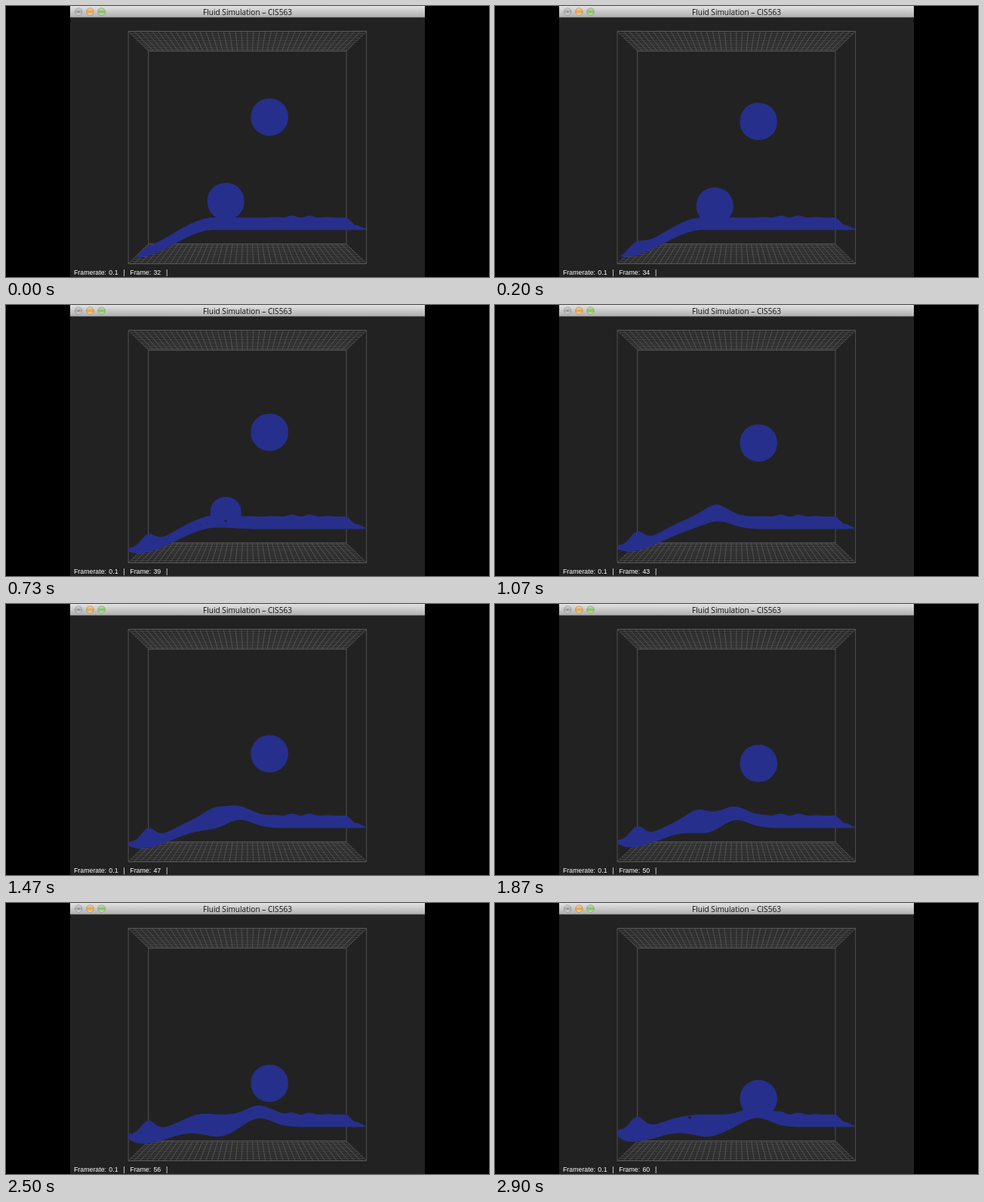
Write an HTML page that moves like this. It is 640 px wide and 360 px high and loops after 3030 ms.

```html
<!DOCTYPE html>
<html lang="en">
<head>
<meta charset="utf-8">
<title>Fluid Simulation</title>
<style>
  html, body { margin: 0; width: 100%; height: 100%; overflow: hidden; background: #000; }
  svg { display: block; width: 640px; height: 360px; }
  .title { font: 10.1px "Open Sans", "Noto Sans", sans-serif; fill: #111; text-anchor: middle; }
  .status { font: 8.8px "Liberation Sans", Arial, sans-serif; fill: #fff; white-space: pre; word-spacing: .9px; }
  .grid { fill: none; stroke: #747474; stroke-width: .5; }
  .box { fill: none; stroke: #626262; stroke-width: .75; }
  .fluid { fill: #272f8c; }
  .gap { fill: #222; }
</style>
</head>
<body>
<svg viewBox="0 0 640 360">
  <defs>
    <linearGradient id="bar" x2="0" y2="1">
      <stop offset="0" stop-color="#e2e2e2"/>
      <stop offset="1" stop-color="#b0b0b0"/>
    </linearGradient>
    <linearGradient id="shine" x2="0" y2="1">
      <stop offset="0" stop-color="#fff" stop-opacity=".55"/>
      <stop offset=".5" stop-color="#fff" stop-opacity="0"/>
      <stop offset="1" stop-color="#fff" stop-opacity=".55"/>
    </linearGradient>
  </defs>
  <rect x="85" width="470" height="360" fill="#222"/>
  <rect x="85" width="470" height="15" fill="url(#bar)"/>
  <rect x="85" y="14.8" width="470" height=".6" fill="#666"/>
  <g id="buttons"></g>
  <text class="title" x="320" y="11.6">Fluid Simulation – CIS563</text>
  <path class="grid" id="grid"/>
  <path class="box" id="box"/>
  <path class="fluid" id="fluid"/>
  <g class="gap" id="gaps"></g>
  <text class="status" id="status" x="90" y="357"></text>
</svg>
<script>
const LOOP = 3030, LEFT = 162, RIGHT = 477, FIRST = 32, LAST = 60;
const el = id => document.getElementById(id);

// Window buttons
el('buttons').innerHTML = ['#a8a8a8', '#e8a244', '#86c060'].map((color, i) => {
  const x = 96.2 + 15.2 * i;
  return `<circle cx="${x}" cy="7.6" r="4.9" fill="${color}" stroke="#888" stroke-width=".5"/>` +
    `<circle cx="${x}" cy="7.6" r="4.4" fill="url(#shine)"/>`;
}).join('') + '<circle cx="96.2" cy="7.6" r="1.2" fill="#888"/>';

// Perspective box: depth 0 is the front face, 1 the back face
function project(u, v, depth) {
  const s = 1 / (1 + 0.203 * depth);
  return `${(319.9 + (u - 0.5) * 315.6 * s).toFixed(2)},${(188 + (v - 0.5) * 308.5 * s).toFixed(2)}`;
}
const line = (a, b) => `M${a}L${b}`;
const COLS = 40, ROWS = 10;
let mesh = '', frame = '';
for (const v of [0, 1]) {
  for (let i = 0; i <= COLS; i++) mesh += line(project(i / COLS, v, 0), project(i / COLS, v, 1));
  for (let j = 0; j <= ROWS; j++) mesh += line(project(0, v, j / ROWS), project(1, v, j / ROWS));
}
for (const d of [0, 1])
  frame += `M${project(0, 0, d)}L${project(1, 0, d)}L${project(1, 1, d)}L${project(0, 1, d)}Z`;
el('grid').setAttribute('d', mesh);
el('box').setAttribute('d', frame);

const bump = (x, center, width) => Math.exp(-(((x - center) / width) ** 2) / 2);
function smooth(v) {
  v = Math.min(1, Math.max(0, v));
  return v * v * (3 - 2 * v);
}
// The left bank slopes down towards the wall
const bank = x => smooth((275 - x) / 105);
// The sunken ball sends one wave to the right that lifts the whole sheet
const crest = k => 296 + 3 * (k - 11);
const impact = k => smooth((k - 5) / 8);

function surface(x, k) {
  const ripple = 1.5 * (1 + Math.cos((x - 378) * Math.PI / 12.5)) * bump(x, 390, 20);
  const rightEnd = 10 * smooth((x - 450) / 14) + 4.5 * smooth((x - 464) / 13);
  const leftTip = 22 * Math.exp(-k / 3) * bump(x, LEFT, 10);
  const wallSplash = 16 * (1 - Math.exp(-k / 4)) * bump(x, 188, 9);
  const rightWave = 12 * impact(k) * bump(x, crest(k), 16);
  const leftWave = 9 * impact(k) * bump(k, 15, 6) * bump(x, 290 - 3 * (k - 11), 14);
  return 281 + (41 - 0.026 * k * k) * bank(x) + rightEnd + leftTip
    - ripple - wallSplash - rightWave - leftWave;
}

function underside(x, k) {
  const leftLift = (2 + 0.3 * k) * Math.exp((LEFT - x) / 12);
  const sag = 13 * smooth((k - 11) / 12) * bump(x, 280, 22);
  const arch = 12 * impact(k) * bump(x, crest(k), 18);
  return 297.5 + (38 - 0.55 * k) * bank(x) + sag - leftLift - arch;
}

const toPath = pts => 'M' + pts.map(p => p[0].toFixed(1) + ',' + p[1].toFixed(1)).join('L') + 'Z';

function sheet(k) {
  const upper = [], lower = [];
  for (let x = LEFT + 10 * Math.exp(-k / 2); x <= RIGHT; x++) {
    const base = underside(x, k);
    upper.push([x, Math.min(surface(x, k), base)]);
    lower.unshift([x, base]);
  }
  return toPath(upper.concat(lower));
}

// Slightly squared ball, cut off at the underside once it touches the sheet
function ball(cx, cy, r, k, touching) {
  const soft = v => Math.sign(v) * Math.abs(v) ** 0.97, pts = [];
  for (let i = 0; i < 72; i++) {
    const a = i * Math.PI / 36, x = cx + r * soft(Math.cos(a)), y = cy + r * soft(Math.sin(a));
    pts.push([x, touching ? Math.min(y, underside(x, k)) : y]);
  }
  return toPath(pts);
}
const gap = (x, y, rx, ry, size) =>
  size > 0 ? `<ellipse cx="${x}" cy="${y}" rx="${rx * size}" ry="${ry * size}"/>` : '';

function draw(step) {
  const k = step - FIRST;
  let d = sheet(k);

  // the first ball sinks in, the second falls with growing speed
  if (k < 11) {
    const sunk = Math.max(0, k - 5), r = 24.5 - 2 * sunk;
    d += ball(291.2, 259.5 + 3 * k - 2.6 * sunk, r, k, true);
  }
  d += ball(349.2, 147.6 + 2.75 * k + 0.045 * k * k, 24.7, k, k > 25);
  el('fluid').setAttribute('d', d);

  const open = 1 - Math.abs(k - 5) / 3;
  el('gaps').innerHTML = gap(291, 287, 6, 3.4, open) + gap(267, 289.5, 2.8, 1.8, open) +
    gap(258, 285, 2.2, 1.8, 1 - (LAST - step) / 3);
  el('status').textContent = `Framerate: 0.1  |  Frame: ${step}  |`;
}

let shown = 0;
function tick() {
  const t = performance.now() % LOOP;
  const step = Math.min(LAST, Math.floor(32.94 + 0.0096 * t));
  if (step !== shown) draw(shown = step);
  requestAnimationFrame(tick);
}
tick();
</script>
</body>
</html>
```
